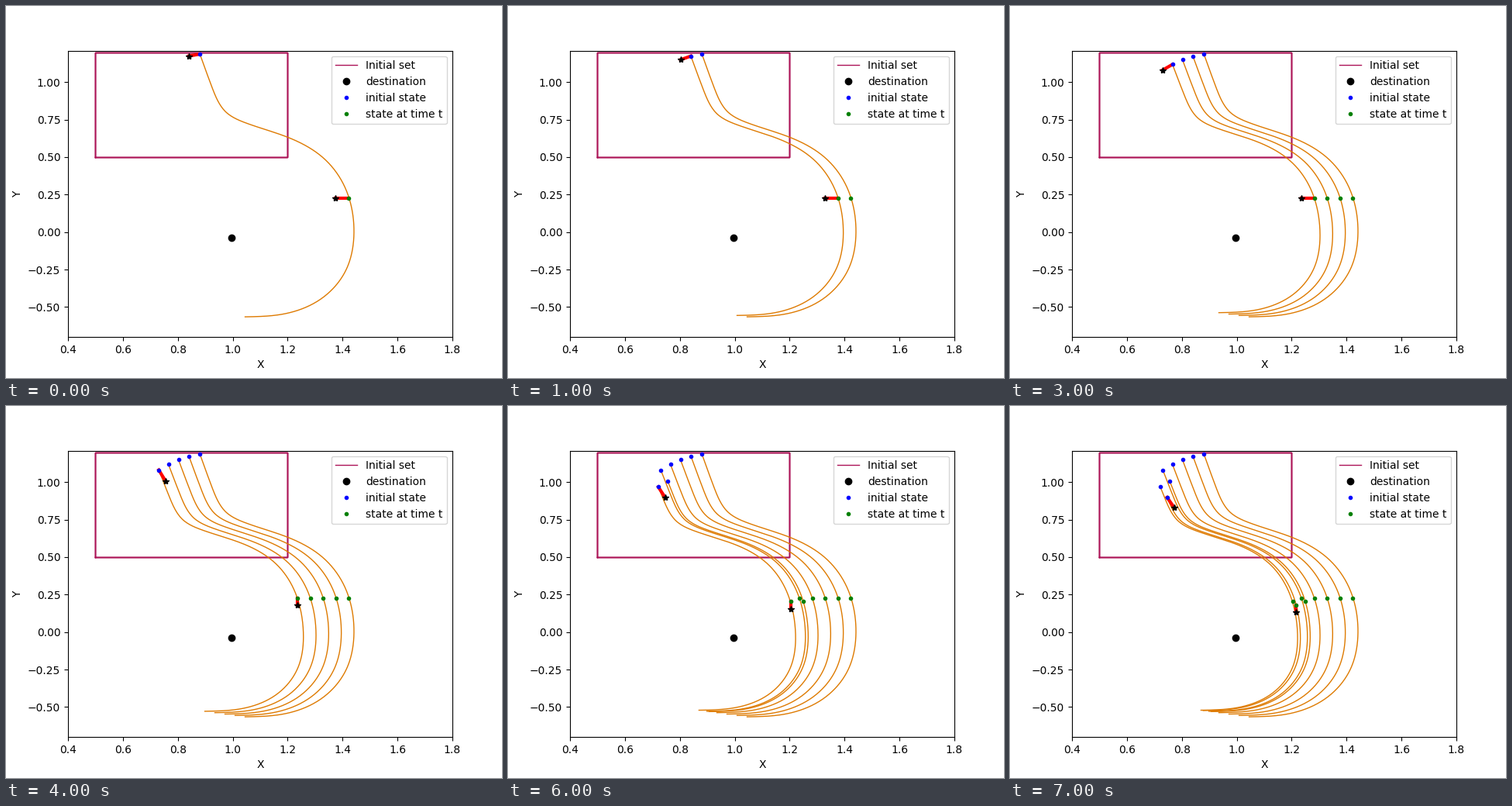
Animation, 640 px wide and 480 px high, one loop 8 s. Source, as a matplotlib script:

```python
import numpy as np
import matplotlib.pyplot as plt
from matplotlib.animation import FuncAnimation

PURPLE, ORANGE = "#ad1457", "#de7a00"
ASPECT = 1.83  # on-screen length of an x unit relative to a y unit
PROBE = 0.048

# Key points of the outermost trajectory.
KEYS = np.array([
    (0.872, 1.23), (0.9236, 0.97), (0.9758, 0.7995), (1.049, 0.727),
    (1.2016, 0.6315), (1.3315, 0.492), (1.402, 0.324), (1.4415, 0),
    (1.4133, -0.2496), (1.323, -0.4434), (1.176, -0.549), (1.045, -0.565)])

# Heights of the successive initial states.
HEIGHTS = [1.187, 1.174, 1.149, 1.118, 1.081, 1.004, 0.968, 0.898, 0.833]
COUNT = len(HEIGHTS) - 1
DOWN = {4, 6, 7}  # steps that probe along y instead of x


def spline(t, p, s):
    """Natural cubic spline through p at knots t, sampled at s."""
    n, h = len(t), np.diff(t)
    a, rhs = np.eye(n), np.zeros_like(p)
    slope = np.diff(p, axis=0) / h[:, None]
    for i in range(1, n - 1):
        a[i, i - 1:i + 2] = h[i - 1], 2 * (h[i - 1] + h[i]), h[i]
        rhs[i] = 6 * (slope[i] - slope[i - 1])
    m = np.linalg.solve(a, rhs)
    i = np.clip(np.searchsorted(t, s) - 1, 0, n - 2)
    d, w = (s - t[i])[:, None], h[i][:, None]
    return (p[i] + d * (slope[i] - w * (2 * m[i] + m[i + 1]) / 6)
            + d**2 * m[i] / 2 + d**3 * (m[i + 1] - m[i]) / (6 * w))


knots = np.r_[0, np.cumsum(np.hypot(*(np.diff(KEYS, axis=0) * (ASPECT, 1)).T))]
u = np.linspace(0, 1, 400)
base_x, base_y = spline(knots / knots[-1], KEYS, u).T
drift = 0.84 - 0.06 * u + 0.2 * np.exp(-((u - 0.58) / 0.25) ** 2)


def trajectory(q, height):
    """Base curve moved sideways by q and flattened, starting at height."""
    x, y = base_x + q * drift, base_y * (1 + 0.354 * q)
    upper = slice(0, 200)
    start = np.interp(-height, -y[upper], x[upper]), height
    below = y < height
    return np.vstack([start, np.column_stack([x, y])[below]])


# Each step moves the tracked state left, or down and slightly right.
moves = np.array([(0.0133, -0.0227) if k in DOWN else (-0.0463, 0)
                  for k in range(COUNT)])
offsets = np.vstack([(0, 0), np.cumsum(moves, axis=0)])
states = offsets + (1.4218, 0.2258)
curves = [trajectory(dx + 0.1365 * dy, h)
          for (dx, dy), h in zip(offsets, HEIGHTS)]
starts = np.array([c[0] for c in curves])
probes = states[:COUNT] + [(0, -PROBE) if k in DOWN else (-PROBE, 0)
                           for k in range(COUNT)]

fig, ax = plt.subplots(figsize=(6.4, 4.8), dpi=100)
ax.set(xlim=(0.4, 1.8), ylim=(-0.7, 1.21), xlabel="X", ylabel="Y")

# Overdrawing the thin outline strengthens its soft edges.
for _ in range(4):
    ax.plot([0.5, 1.2, 1.2, 0.5, 0.5], [0.5, 0.5, 1.2, 1.2, 0.5],
            color=PURPLE, lw=1)
paths = [ax.plot(*c.T, color=ORANGE, lw=1)[0] for c in curves[:COUNT]]
arrows = [ax.plot([], [], "r-", lw=3)[0] for _ in range(2)]
start_dots, = ax.plot([], [], "b.")
state_dots, = ax.plot([], [], "g.")
stars, = ax.plot([], [], "k*")
ax.plot(0.995, -0.038, "ko")


def key(label, **style):
    return plt.Line2D([], [], label=label, **style)


ax.legend(loc="upper right", handles=[
    key("Initial set", color=PURPLE, lw=1),
    key("destination", color="k", marker="o", ls=""),
    key("initial state", color="b", marker=".", ls=""),
    key("state at time t", color="g", marker=".", ls="")])


def update(k):
    for i, path in enumerate(paths):
        path.set_visible(i <= k)
    start_dots.set_data(*starts[:k + 1].T)
    state_dots.set_data(*states[:k + 1].T)
    tips = np.array([starts[k + 1], probes[k]])
    stars.set_data(*tips.T)
    for arrow, tail, tip in zip(arrows, (starts[k], states[k]), tips):
        arrow.set_data(*zip(tail, tip))
    return [*paths, *arrows, start_dots, state_dots, stars]


anim = FuncAnimation(fig, update, frames=COUNT, interval=1000, repeat=True,
                     repeat_delay=0)
plt.show()
```
